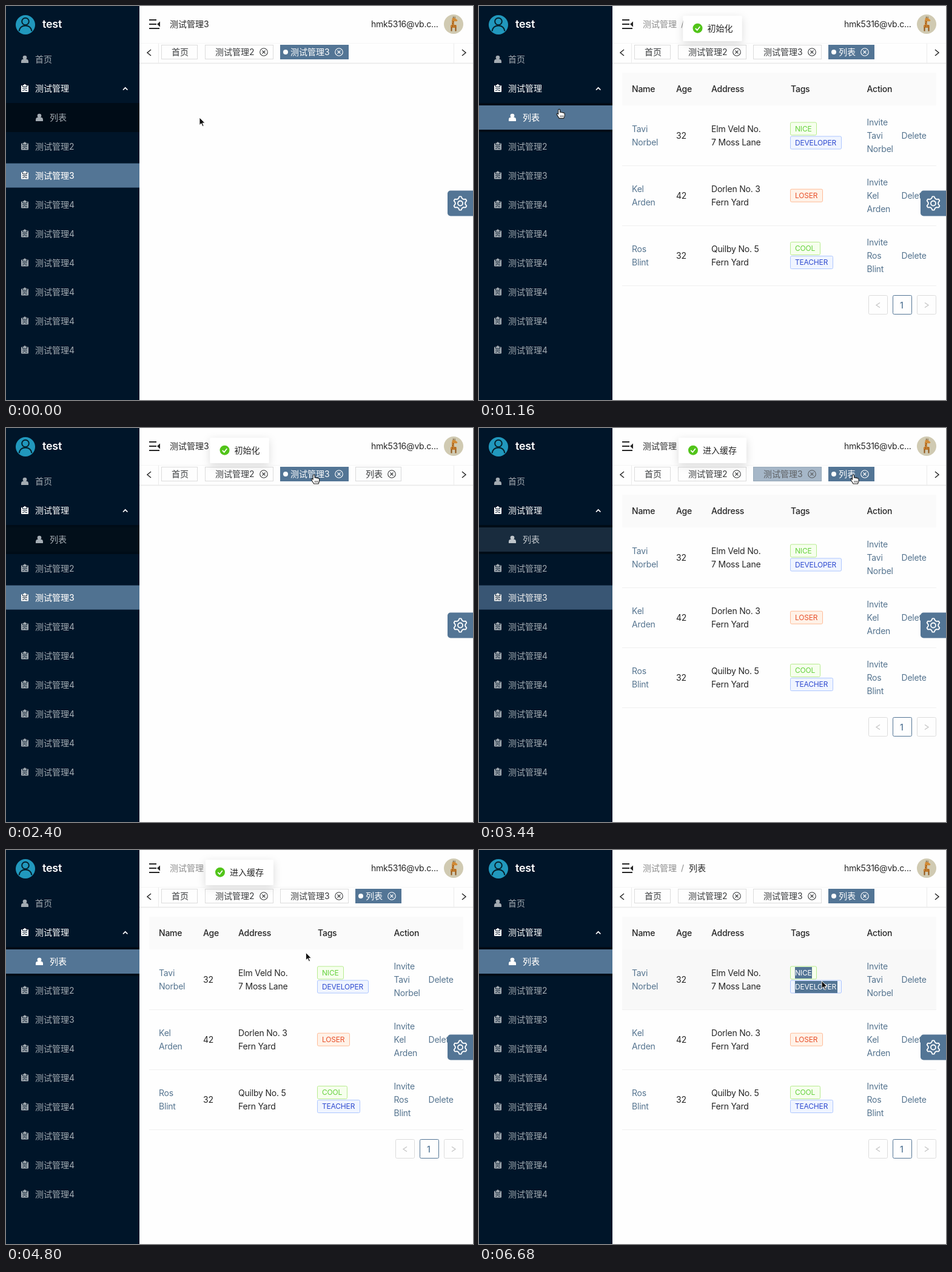
Animation of 770 by 650 pixels, one loop 6760 ms. Source, as an HTML page:

```html
<!DOCTYPE html>
<html lang="zh">
<head>
<meta charset="utf-8">
<title>Admin tabs</title>
<style>
  html, body { margin: 0; width: 100%; height: 100%; overflow: hidden; background: #fefefe; }
  svg { display: block; width: 100%; height: 100%; }
  text { font-family: Inter, 'Noto Sans CJK SC', 'Noto Sans CJK', 'Noto Sans', sans-serif; white-space: pre; }
  .latin { letter-spacing: -.015em; }
</style>
</head>
<body>
<svg id="stage" viewBox="0 0 770 650"></svg>
<script>
const LOOP = 6760;
const OPEN = 600, LEAVE = 2130, BACK = 3330, SELECT = 5440;
const PAPER = '#fefefe', INK = '#262626', THEME = '#537595', RULE = '#f0f0f0', BORDER = '#dcdcdc';
const DIM = '#a3abb2', SOFT = '#55748f', GREY = '#8c8c8c', SIDE = '#001529', WHITE = '#fff';
const stage = document.getElementById('stage');

function el(tag, attrs, parent = stage) {
  const node = document.createElementNS('http://www.w3.org/2000/svg', tag);
  for (const k in attrs) node.setAttribute(k, attrs[k]);
  parent.appendChild(node);
  return node;
}
const group = (parent, attrs = {}) => el('g', attrs, parent);
const rect = (p, x, y, width, height, fill, more = {}) => el('rect', { x, y, width, height, fill, ...more }, p);
const circle = (p, cx, cy, r, fill, more = {}) => el('circle', { cx, cy, r, fill, ...more }, p);
const stroke = (p, d, color, w = 1, more = {}) => el('path', { d, fill: 'none', stroke: color, 'stroke-width': w, ...more }, p);
const fillPath = (p, d, fill, more = {}) => el('path', { d, fill, ...more }, p);

// y is the vertical middle of the line
function text(p, x, y, str, fill = INK, size = 14, weight = 400) {
  const t = el('text', { x, y: y + size * .36, fill, 'font-size': size, 'font-weight': weight }, p);
  if (/^[\x20-\x7e]+$/.test(str)) t.setAttribute('class', 'latin');
  t.textContent = str;
  return t;
}

const defs = el('defs', {});
const shade = el('filter', { id: 'shade', x: '-30%', y: '-60%', width: '160%', height: '240%' }, defs);
el('feDropShadow', { dx: 0, dy: 4, stdDeviation: 7, 'flood-color': '#000', 'flood-opacity': .14 }, shade);

/* ---------- sidebar ---------- */
function userIcon(p, x, y, c) {
  circle(p, x, y - 3, 3.3, c);
  fillPath(p, `M${x - 6} ${y + 6}v-2.5q0-3.5 3.5-3.8h5q3.5 .3 3.5 3.8v2.5z`, c);
}
function boardIcon(p, x, y, c) {
  const g = group(p, { transform: `translate(${x} ${y})` });
  rect(g, -6, -5, 12, 11, c, { rx: 1 });
  stroke(g, 'M-3.5 -5v2.5h7v-2.5M-4 .2h8M-4 3.4h2l1.5-1.5l1.5 1.5h3', SIDE, 1);
  stroke(g, 'M-2.5 -5h5M0 -7v2', c, 2);
}

const side = group();
rect(side, 0, 0, 220, 650, SIDE);
rect(side, 0, 160, 220, 48, '#000c17');
circle(side, 32, 31, 16, '#2198bd');
circle(side, 32, 25.5, 5.8, 'none', { stroke: '#06202c', 'stroke-width': 2 });
stroke(side, 'M21.5 41.5q1.5-9 10.5-9t10.5 9', '#06202c', 2);
text(side, 60, 30, 'test', WHITE, 18, 600);

function menuItem(y, label, icon, x = 31) {
  const bg = rect(side, 0, y - 20, 220, 40, THEME, { opacity: 0 });
  const draw = color => {
    const g = group(side);
    icon(g, x, y, color);
    text(g, x + 17, y, label, color);
    return g;
  };
  draw(DIM);
  const lit = draw(WHITE);
  lit.setAttribute('opacity', 0);
  return { bg, lit };
}
menuItem(88, '首页', userIcon);
boardIcon(side, 31, 136, WHITE);
text(side, 48, 136, '测试管理', WHITE, 14, 500);
stroke(side, 'M193 138.5l3.7-3.7l3.7 3.7', WHITE, 1.7);
const listItem = menuItem(184, '列表', userIcon, 55);
const [, thirdItem] = [2, 3, 4, 4, 4, 4, 4, 4].map((n, i) => menuItem(231.6 + i * 48, '测试管理' + n, boardIcon));

/* ---------- header ---------- */
const head = group();
stroke(head, 'M236 23h12M236 30h12M236 37h17', INK, 2.2);
fillPath(head, 'M254 25.5v9l-5-4.5z', INK);
const crumb3 = text(head, 270, 30, '测试管理3');
const crumbs = group(head);
text(crumbs, 270, 30, '测试管理', GREY);
const crumbDark = text(crumbs, 270, 30, '测试管理');
const crumbTail = group(crumbs);
text(crumbTail, 333, 30, '/', GREY);
text(crumbTail, 346, 30, '列表');
text(head, 602, 30, 'hmk5316@vb.c...');
circle(head, 738, 30, 16, '#d0cab2');
stroke(head, 'M737 22.5v11', '#c67c2c', 3.6);
rect(head, 733, 31, 10, 5, '#c67c2c', { rx: 2 });
stroke(head, 'M734.5 35v6.5M741.5 35v6.5', '#8f5517', 2);
fillPath(head, 'M735.5 20h5l4 3.5l-1 1.8h-7z', '#d18a35');
stroke(head, 'M737.5 20v-2.5M740 20v-2.5', '#6a4216', 1);
stroke(head, 'M737 26h1M736 29h1M736 33h1M740 33h1', '#6a4216', 1.4);

stroke(head, 'M220 61.5h550', '#f5f5f5');
stroke(head, 'M220 94.5h550', '#e8e8e8', 1.5);
stroke(head, 'M251.5 62v32M738.5 62v32', '#ebebeb');
stroke(head, 'M239 72l-6 5l6 5M752 72l6 5l-6 5', INK, 1.5);

/* ---------- tabs ---------- */
function tab(x, w, label, closable = true) {
  const root = group(head);
  const box = (bg, border) => rect(root, x + .5, 64.5, w - 1, 23, bg, { stroke: border });
  const face = ink => {
    const g = group(root);
    text(g, x + 17, 76, label, ink);
    if (closable) {
      const cx = x + w - 16;
      circle(g, cx, 76, 6.3, 'none', { stroke: ink, 'stroke-width': 1.1 });
      stroke(g, `M${cx - 2.5} 73.5l5 5m0-5l-5 5`, ink, 1.1);
    }
    return g;
  };
  box(PAPER, BORDER);
  const bg = box(THEME, THEME);
  const dark = face('#3a3c3e'), light = face(WHITE);
  const dot = circle(root, x + 9, 76, 4, WHITE);
  // the label turns white only late in the fill
  const fill = p => {
    fade(bg, p);
    fade(light, p ** 3);
    fade(dark, 1 - p ** 3);
  };
  fill(0);
  fade(dot, 0);
  return { root, fill, dot };
}

/* ---------- timing helpers ---------- */
const clamp = x => Math.max(0, Math.min(1, x));
const smooth = x => x * x * (3 - 2 * x);
const easeOut = x => 1 - (1 - x) ** 2;
const ramp = (t, start, ease = smooth, span = 300) => ease(clamp((t - start) / span));
const pulse = (t, on, off, ease) => ramp(t, on, ease) - ramp(t, off, ease);
const fade = (node, v) => node.setAttribute('opacity', v.toFixed(3));
const show = (node, on) => node.setAttribute('visibility', on ? 'visible' : 'hidden');

tab(256, 60, '首页', false);
const tab2 = tab(328, 113, '测试管理2');
const tab3 = tab(452, 113, '测试管理3');
const tabList = tab(576, 76, '列表');

/* ---------- table ---------- */
const table = group();
rect(table, 236, 110, 518, 54, '#fafafa');
const cols = { Name: 252, Age: 325, Address: 383, Tags: 514, Action: 639.5 };
for (const name in cols) text(table, cols[name], 137, name, INK, 14, 500);
const rowHover = rect(table, 236, 164, 518, 99, '#f8f8f8', { opacity: 0 });

const tints = {
  green: ['#f6ffed', '#b7eb8f', '#64d13c'],
  blue: ['#f0f5ff', '#adc6ff', '#2f4bd0'],
  red: ['#fff2e8', '#ffbb96', '#e8502a']
};
function tag(y, w, label, tint) {
  const [bg, border, ink] = tints[tint];
  rect(table, 513.5, y - 10.5, w - 1, 21, bg, { stroke: border, rx: 2 });
  text(table, 521, y, label, ink, 12);
}
const rows = [
  [214, 'Tavi', 'Norbel', 32, 'Elm Veld No.', '7 Moss Lane', [['NICE', 44, 'green'], ['DEVELOPER', 85, 'blue']]],
  [312.7, 'Kel', 'Arden', 42, 'Dorlen No. 3', 'Fern Yard', [['LOSER', 54, 'red']]],
  [411.5, 'Ros', 'Blint', 32, 'Quilby No. 5', 'Fern Yard', [['COOL', 50, 'green'], ['TEACHER', 71, 'blue']]]
];
for (const [y, first, last, age, addr1, addr2, tags] of rows) {
  text(table, 252, y - 11, first, SOFT);
  text(table, 252, y + 11, last, SOFT);
  text(table, 325, y, String(age));
  text(table, 383, y - 11, addr1);
  text(table, 383, y + 11, addr2);
  ['Invite', first, last].forEach((s, i) => text(table, 639.5, y - 22 + i * 22, s, SOFT));
  text(table, 696.5, y, 'Delete', SOFT);
  tags.forEach(([label, w, tint], i) => tag(y + (tags.length > 1 ? i * 23 - 11.5 : 0), w, label, tint));
  stroke(table, `M236 ${Math.round(y + 49) + .5}h518`, RULE);
}
const picked = group(table);
rect(picked, 521, 193, 28, 19, THEME);
rect(picked, 521, 216, 70, 20, THEME);
text(picked, 521, 202.5, 'NICE', WHITE, 12);
text(picked, 521, 225.5, 'DEVELOPER', WHITE, 12);

[642, 682, 722].forEach((x, i) =>
  rect(table, x + .5, 477.5, 31, 31, PAPER, { stroke: i === 1 ? THEME : BORDER, rx: 2 }));
stroke(table, 'M661 489.5l-6 4l6 4M735 489.5l6 4l-6 4', '#c4c4c4', 1.2);
text(table, 694, 493.5, '1', THEME, 14, 500);

/* ---------- settings button ---------- */
const cog = group();
rect(cog, 728, 304.5, 50, 42, THEME, { rx: 5 });
let gear = '';
for (let i = 0; i < 24; i++) {
  const a = (i + 1.5) * Math.PI / 12, r = i % 4 < 2 ? 11.3 : 8.3;
  gear += `${i ? 'L' : 'M'}${(749 + r * Math.cos(a)).toFixed(1)} ${(325.5 + r * Math.sin(a)).toFixed(1)}`;
}
stroke(cog, gear + 'z', WHITE, 1.8, { 'stroke-linejoin': 'round' });
circle(cog, 749, 325.5, 4, 'none', { stroke: WHITE, 'stroke-width': 1.8 });

/* ---------- toast ---------- */
const toast = group();
function message(x, w, label) {
  const g = group(toast);
  rect(g, x, 16, w, 42, WHITE, { rx: 2, filter: 'url(#shade)' });
  circle(g, x + 24, 36.7, 8, '#52c41a');
  stroke(g, `M${x + 20.3} 36.9l2.9 3l4.6-6`, WHITE, 1.7);
  text(g, x + 40, 37, label);
  return g;
}
const msgInit = message(336.5, 97, '初始化');
const msgCache = message(329, 112, '进入缓存');

/* ---------- pointer ---------- */
const ring = circle(stage, 565, 217, 4.2, '#f0d8cc', { stroke: '#e2603c', 'stroke-width': 1.8 });
const pointer = group();
const arrow = fillPath(pointer, 'M0 0v12.5l3-2.7l2.1 4.8l2-.9l-2.1-4.6h4z', '#111', { stroke: WHITE, 'stroke-width': .9 });
const hand = group(pointer);
fillPath(hand, 'M-1.5 1q1.5-2 3 0v4q1.5-1 2.5 .4q1.6-.8 2.5 .6q2.5-.6 2.5 1.8v3.2l-1.5 4h-7.5l-4-6.5q-.5-2 1.5-1.5l1 1.2z',
  WHITE, { stroke: '#1a1a1a', 'stroke-width': 1.1, 'stroke-linejoin': 'round' });
stroke(hand, 'M2 10v3M4.2 10v3M6.4 10v3', '#1a1a1a', .8);

// start, end, x, y of each pointer move
const moves = [
  [40, 560, 102, 178],
  [1040, 1760, 503, 77],
  [2360, 2700, 617, 77],
  [3940, 4200, 361, 81],
  [4360, 5090, 565, 216]
];
function pointerAt(t) {
  let x = 319, y = 184;
  for (const [start, end, toX, toY] of moves) {
    const k = ramp(t, start, smooth, end - start);
    x += (toX - x) * k;
    y += (toY - y) * k;
  }
  return [x, y];
}

function render(t) {
  const onList = (t >= OPEN && t < LEAVE) || t >= BACK;
  const listOn = pulse(t, OPEN, LEAVE) + ramp(t, BACK);
  fade(listItem.bg, listOn);
  fade(listItem.lit, Math.max(listOn, pulse(t, 260, 1180)));
  fade(thirdItem.bg, 1 - listOn);
  fade(thirdItem.lit, 1 - listOn);

  show(crumb3, !onList);
  show(crumbs, onList);
  const crumbIn = ramp(t, t < BACK ? OPEN : BACK);
  fade(crumbDark, 1 - crumbIn);
  fade(crumbTail, crumbIn);

  show(tabList.root, t >= OPEN);
  tab2.fill(pulse(t, 4080, 4440, easeOut));
  tab3.fill(1 - ramp(t, OPEN + 25, easeOut) + ramp(t, 1620, easeOut) - ramp(t, BACK + 25, easeOut));
  tabList.fill(1 - pulse(t, LEAVE, 2580, easeOut));
  fade(tab3.dot, onList ? 0 : 1);
  fade(tabList.dot, onList ? 1 : 0);

  show(table, onList);
  fade(rowHover, ramp(t, 4770));
  picked.setAttribute('display', t >= SELECT ? 'inline' : 'none');
  show(ring, t >= SELECT + 40 && t < 6080);

  const shown = ramp(t, OPEN - 20, easeOut, 200) - ramp(t, 6360, smooth, 280);
  fade(toast, shown);
  toast.setAttribute('transform', `translate(0 ${(-42 * (1 - shown)).toFixed(2)})`);
  show(msgInit, t < BACK);
  show(msgCache, t >= BACK);

  const [x, y] = pointerAt(t);
  const link = x < 220 || (y > 63 && y < 89 && x > 256 && x < 652);
  pointer.setAttribute('transform', `translate(${x.toFixed(1)} ${y.toFixed(1)})`);
  show(hand, link);
  show(arrow, !link);
}

const begin = performance.now();
function tick() {
  render((performance.now() - begin) % LOOP);
  requestAnimationFrame(tick);
}
tick();
</script>
</body>
</html>
```
